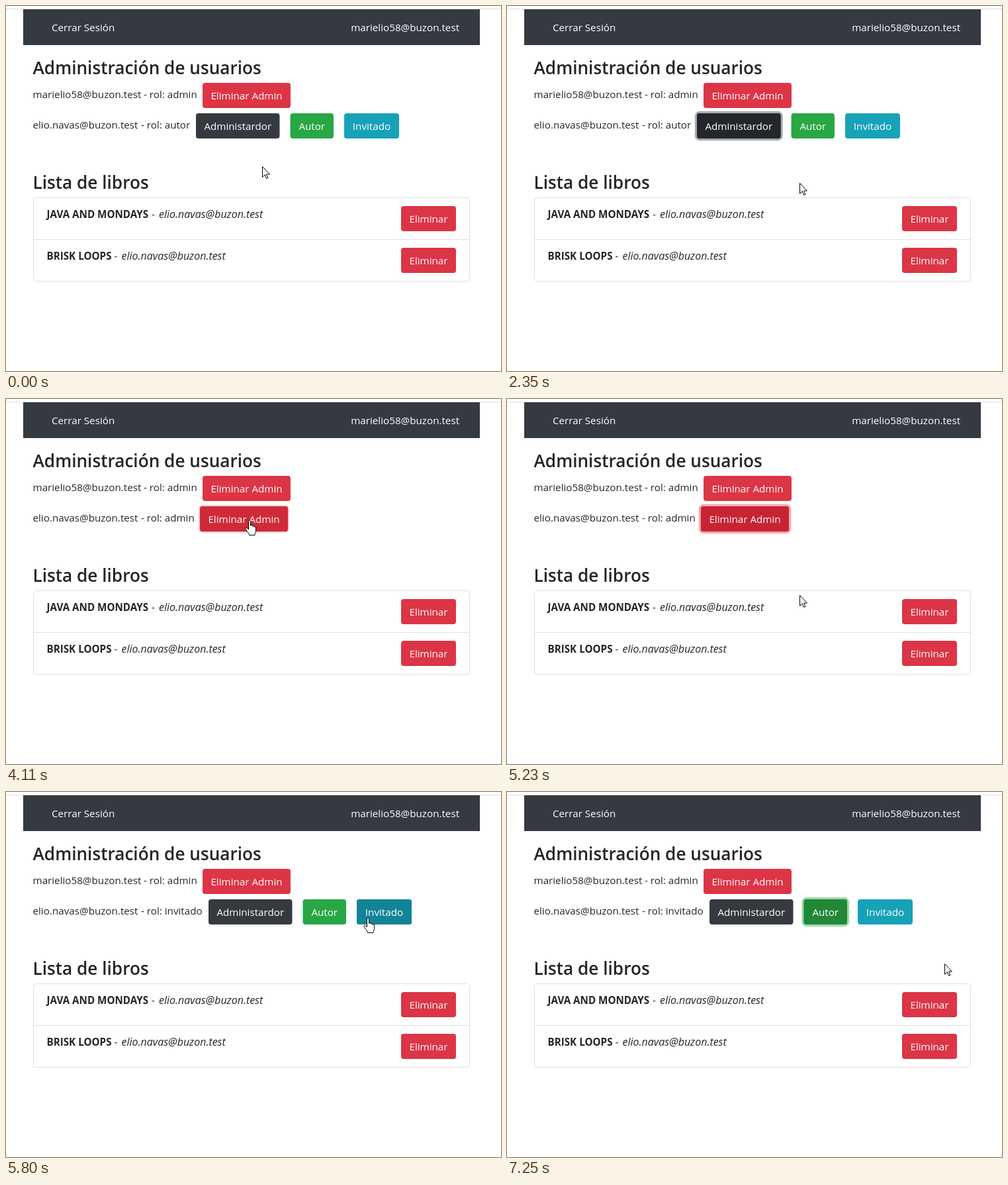
These frames come from a looping animation (748 px wide and 551 px high, 8 s). An HTML page:

```html
<!DOCTYPE html>
<html lang="es">
<head>
<meta charset="utf-8">
<title>Administración de usuarios</title>
<style>
  html, body { margin: 0; width: 100%; height: 100%; overflow: hidden; background: #fff; }
  svg { display: block; width: 100%; height: 100%; }
  text { font: 15.2px "Open Sans", "Noto Sans", sans-serif; fill: #212529; white-space: pre; }
  .light { fill: #fff; }
  .mid { text-anchor: middle; }
  .end { text-anchor: end; }
  .title { font-size: 26.2px; font-weight: 600; }
  .bold { font-weight: 700; }
  .slant { font-size: 16px; font-style: italic; }
</style>
</head>
<body>
<svg viewBox="0 0 748 551">
  <g id="page"></g>
  <g id="roles"></g>
  <g id="cursor" fill="#fff" stroke="#000" stroke-linejoin="round">
    <path id="arrow" d="M.5.5V16.3L4.2 12.8L6.7 18.4L8.9 17.4L6.5 12H11.4Z"/>
    <path id="hand" d="M5.5 14V2.2C5.5 .1 8.5 .1 8.5 2.2V8.5C8.5 6.8 11.2 6.9 11.2 8.7V9.3C11.4 7.8 13.9 8 13.9 9.7V10.4C14.2 9.2 16.5 9.4 16.5 11V16.5C16.5 18.5 15 19.5 15 22.5H6.5C6.5 20 4 18 1 13.2C.2 11.6 2.2 10.4 3.4 11.8Z"/>
  </g>
</svg>
<script>
const LOOP = 8000;
const ADMIN = 'marielio58@buzon.test', AUTHOR = 'elio.navas@buzon.test';
const el = id => document.getElementById(id);

// Fill, hover fill and focus ring colour
const RED = ['#dc3545', '#c82333', '#e15361'];
const DARK = ['#343a40', '#23272b', '#52585d'];
const GREEN = ['#28a745', '#218838', '#48b461'];
const TEAL = ['#17a2b8', '#138496', '#3ab0c3'];

const text = (x, y, str, cls = '') => `<text x="${x}" y="${y}" class="${cls}">${str}</text>`;

const rect = (x, y, w, h, r, attrs) =>
  `<rect x="${x}" y="${y}" width="${w}" height="${h}" rx="${r}" ${attrs}/>`;

function button(x, y, w, label, [fill, dark, glow], hover = 0, ring = 0) {
  const s = 3.2 * ring;
  return (ring ? rect(x - s, y - s, w + 2 * s, 38 + 2 * s, 4 + s, `fill="${glow}" opacity="${ring / 2}"`) : '')
    + rect(x, y, w, 38, 4, `fill="${fill}"`)
    + (hover ? rect(x, y, w, 38, 4, `fill="${dark}" opacity="${hover}"`) : '')
    + text(x + w / 2, y + 25, label, 'light mid');
}

const book = (y, title, dashX) =>
  text(61.5, y, title, 'bold') + text(dashX, y, '-') + text(dashX + 11, y, AUTHOR, 'slant')
  + button(597, y - 18, 83, 'Eliminar', RED);

el('page').innerHTML =
  rect(0, 4, 748, 1, 0, 'fill="#dcdddf"')
  + rect(26, 5, 690, 54, 0, 'fill="#343a40"')
  + text(69, 38, 'Cerrar Sesión', 'light')
  + text(685, 38, ADMIN, 'light end')
  + text(40.5, 103, 'Administración de usuarios', 'title')
  + text(40.5, 139, ADMIN) + text(208, 139, '- rol: admin')
  + button(297, 116, 133, 'Eliminar Admin', RED)
  + text(40.5, 185, AUTHOR)
  + text(40.5, 276, 'Lista de libros', 'title')
  + rect(41.5, 289.5, 659, 126, 4, 'fill="none" stroke="#dfdfdf"')
  + rect(42, 352, 658, 1, 0, 'fill="#dfdfdf"')
  + book(320, 'JAVA AND MONDAYS', 220)
  + book(383, 'BRISK LOOPS', 163.5);

// Time, shape, left, top
const moves = [
  [0, 'arrow', 387, 242], [430, 'arrow', 380, 221], [550, 'hand', 355, 190], [670, 'hand', 348, 186],
  [1660, 'hand', 355, 200], [1810, 'arrow', 398, 222], [1930, 'arrow', 422, 238],
  [2080, 'arrow', 440, 262], [2230, 'arrow', 443, 266], [2350, 'arrow', 442, 267],
  [3690, 'arrow', 433, 262], [3840, 'arrow', 401, 223], [3960, 'hand', 361, 183],
  [4500, 'hand', 371, 187], [4620, 'arrow', 414, 252], [4740, 'arrow', 437, 299],
  [5110, 'arrow', 441, 297], [5230, 'arrow', 442, 296], [5380, 'arrow', 458, 273],
  [5530, 'arrow', 495, 229], [5650, 'hand', 532, 191], [5800, 'hand', 540, 190],
  [5920, 'hand', 546, 188], [6070, 'hand', 550, 187], [6350, 'hand', 511, 183],
  [6500, 'hand', 482, 182], [6860, 'hand', 486, 190], [6980, 'hand', 497, 201],
  [7130, 'arrow', 588, 233], [7250, 'arrow', 661, 259]
];

// Strength between two times: part way for the first 120 ms, then full
const level = (t, from, to, first = .6) => t < from || t >= to ? 0 : t < from + 120 ? first : 1;

function roles(t) {
  const role = t < 3100 ? 'autor' : t < 5380 ? 'admin' : 'invitado';
  const label = text(204, 185, '- rol: ' + role);
  if (role == 'admin')
    return label + button(293, 162, 133, 'Eliminar Admin', RED, level(t, 4110, 5380), level(t, 4110, 5380));
  const x = role == 'autor' ? 287 : 306;
  return label
    + button(x, 162, 126.5, 'Administardor', DARK, level(t, 550, 3100), level(t, 1410, 3100))
    + button(x + 142.5, 162, 65.5, 'Autor', GREEN, level(t, 6500, LOOP, 1), level(t, 6740, LOOP))
    + button(x + 224, 162, 83, 'Invitado', TEAL, level(t, 5800, 6500, 1));
}

let last = '';
function draw(now) {
  const t = now % LOOP;
  const [, shape, x, y] = moves.findLast(m => m[0] <= t);
  el('arrow').style.display = shape == 'arrow' ? '' : 'none';
  el('hand').style.display = shape == 'hand' ? '' : 'none';
  el('cursor').setAttribute('transform', `translate(${x} ${y})`);
  const html = roles(t);
  if (html != last) el('roles').innerHTML = last = html;
  requestAnimationFrame(draw);
}
draw(0);
</script>
</body>
</html>
```
